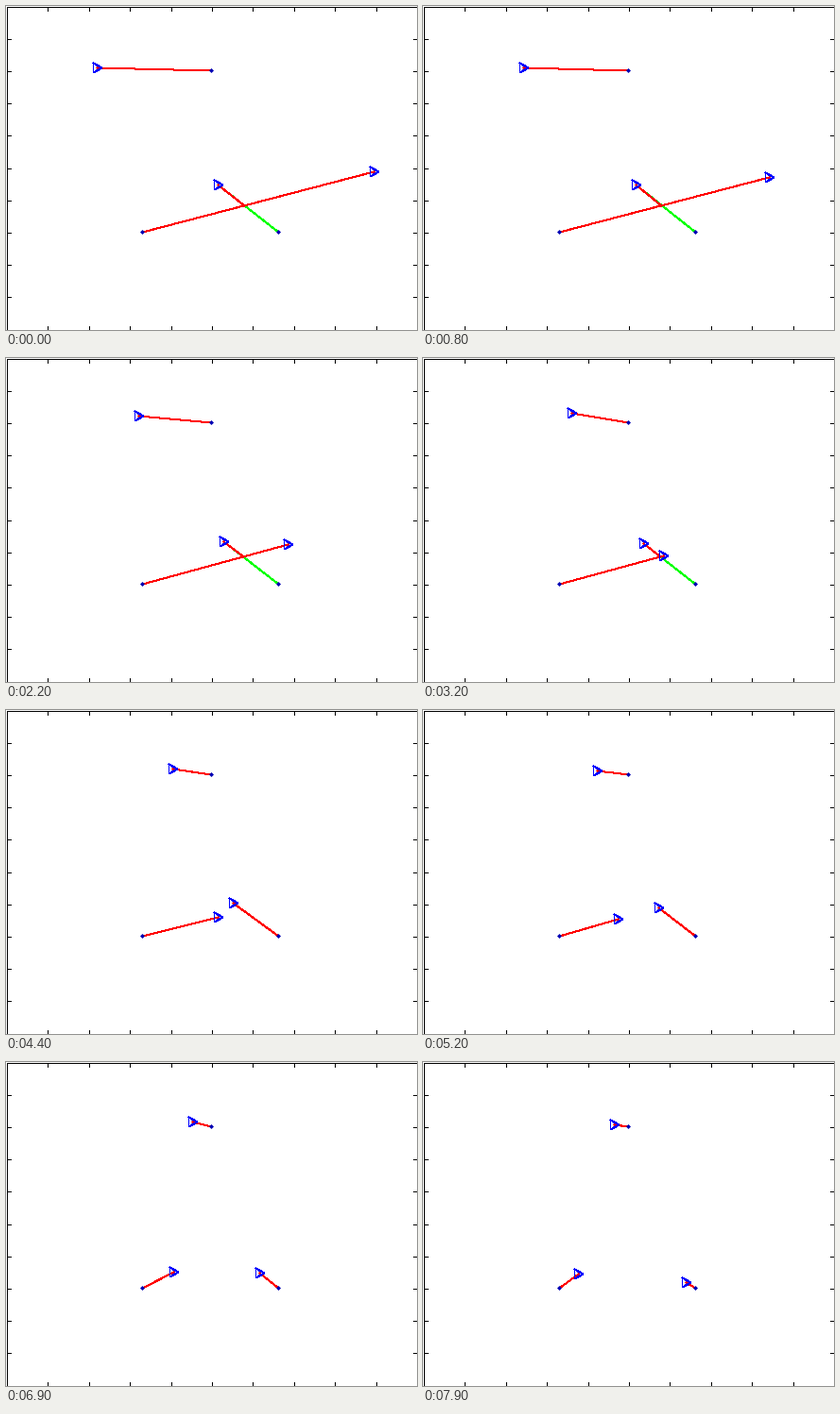
Write a matplotlib script that moves like this. It is 435 by 343 pixels and loops after 8000 ms.

```python
import numpy as np
import matplotlib.pyplot as plt
from matplotlib.animation import FuncAnimation

W, H, DPI = 435, 343, 64  # a power of two keeps the pixel size exact
FRAMES, STEP = 80, 100
PX = 72 / DPI

GOALS = [(217, 68), (144, 239), (288, 239)]

# Waypoints of each robot: seconds, x, y
ROUTES = [
    [(0, 96, 65), (.4, 99.5, 65), (.8, 106, 65), (.9, 108, 65), (1.8, 130, 64),
     (2.2, 140, 61.3), (2.7, 148.3, 58), (3.2, 157, 58), (3.6, 163.5, 60),
     (4.4, 176, 62), (5.4, 186, 64), (6, 191, 65), (6.7, 196, 63.3),
     (7.2, 199, 64), (7.9, 202, 66)],
    [(0, 389, 175), (.4, 381.5, 177), (.8, 366, 181), (.9, 361, 182.3),
     (1.8, 318, 192.5), (2.2, 298, 197), (3.2, 254, 209), (3.6, 242, 213),
     (4.4, 224, 219), (6, 190, 221), (7.9, 164, 224)],
    [(0, 224, 189), (.8, 225, 189), (2.2, 230, 194), (3.2, 233, 196),
     (4.4, 240, 204), (6, 259, 215), (7.9, 278, 233)],
]


def smooth(t, keys):
    """Cubic Hermite path through (time, x, y) keys."""
    k = np.array(keys, float)
    times, pts = k[:, 0], k[:, 1:]
    slopes = np.gradient(pts, times, axis=0)
    i = min(np.searchsorted(times, t, side="right") - 1, len(times) - 2)
    h = times[i + 1] - times[i]
    u = (t - times[i]) / h
    return ((1 + 2 * u) * (1 - u) ** 2 * pts[i] + u * (1 - u) ** 2 * h * slopes[i]
            + u * u * (3 - 2 * u) * pts[i + 1] + u * u * (u - 1) * h * slopes[i + 1])


def crossing(a, b, c, d):
    """Point where segments ab and cd meet, or None."""
    m = np.column_stack([b - a, c - d])
    if abs(np.linalg.det(m)) < 1e-9:
        return None
    s, r = np.linalg.solve(m, c - a)
    return a + s * (b - a) if 0 <= s <= 1 and 0 <= r <= 1 else None


fig = plt.figure(figsize=(W / DPI, H / DPI), dpi=DPI, facecolor="white")
ax = fig.add_axes([0, 0, 1, 1])
ax.set_xlim(-.5, W - .5)
ax.set_ylim(H - .5, -.5)
ax.axis("off")


def stroke(color, z, xs=(), ys=()):
    return ax.plot(xs, ys, color=color, lw=PX, zorder=z, antialiased=False,
                   solid_capstyle="projecting", solid_joinstyle="bevel")[0]


def draw_frame():
    r, b = W - 1, H - 1
    stroke("black", 5, [0, r, r, 0, 0], [0, 0, b, b, 0])
    for i in range(1, 10):
        x, y = int(r * i / 10 + .5), int(b * i / 10)
        for y0, y1 in ((0, 4), (b - 4, b)):
            stroke("black", 5, [x, x], [y0, y1])
        for x0, x1 in ((0, 4), (r - 4, r)):
            stroke("black", 5, [x0, x1], [y, y])


draw_frame()
for gx, gy in GOALS:
    ax.fill([gx - 2.5, gx, gx + 2.5, gx], [gy, gy - 2.5, gy, gy + 2.5],
            color="#0000b4", lw=0, zorder=3)

blocked = stroke("lime", 1)
paths = [stroke("red", 2) for _ in GOALS]
robots = [stroke("blue", 4) for _ in GOALS]
TRI = np.array([(-4, -5), (5, 0), (-4, 5), (-4, -5)])


def update(n):
    t = n * STEP / 1000
    pos = [np.round(smooth(t, route)) for route in ROUTES]
    ends = [np.array(g, float) for g in GOALS]
    blocked.set_data([], [])
    hit = crossing(pos[2], ends[2], pos[1], ends[1])
    if hit is not None:
        blocked.set_data(*zip(pos[2], ends[2]))
        ends[2] = np.round(hit)
    for p, e, path, robot in zip(pos, ends, paths, robots):
        path.set_data(*zip(p, e))
        robot.set_data(*(TRI + p).T)
    return [blocked, *paths, *robots]


anim = FuncAnimation(fig, update, frames=FRAMES, interval=STEP,
                     repeat=True, repeat_delay=0, blit=False)
plt.show()
```
